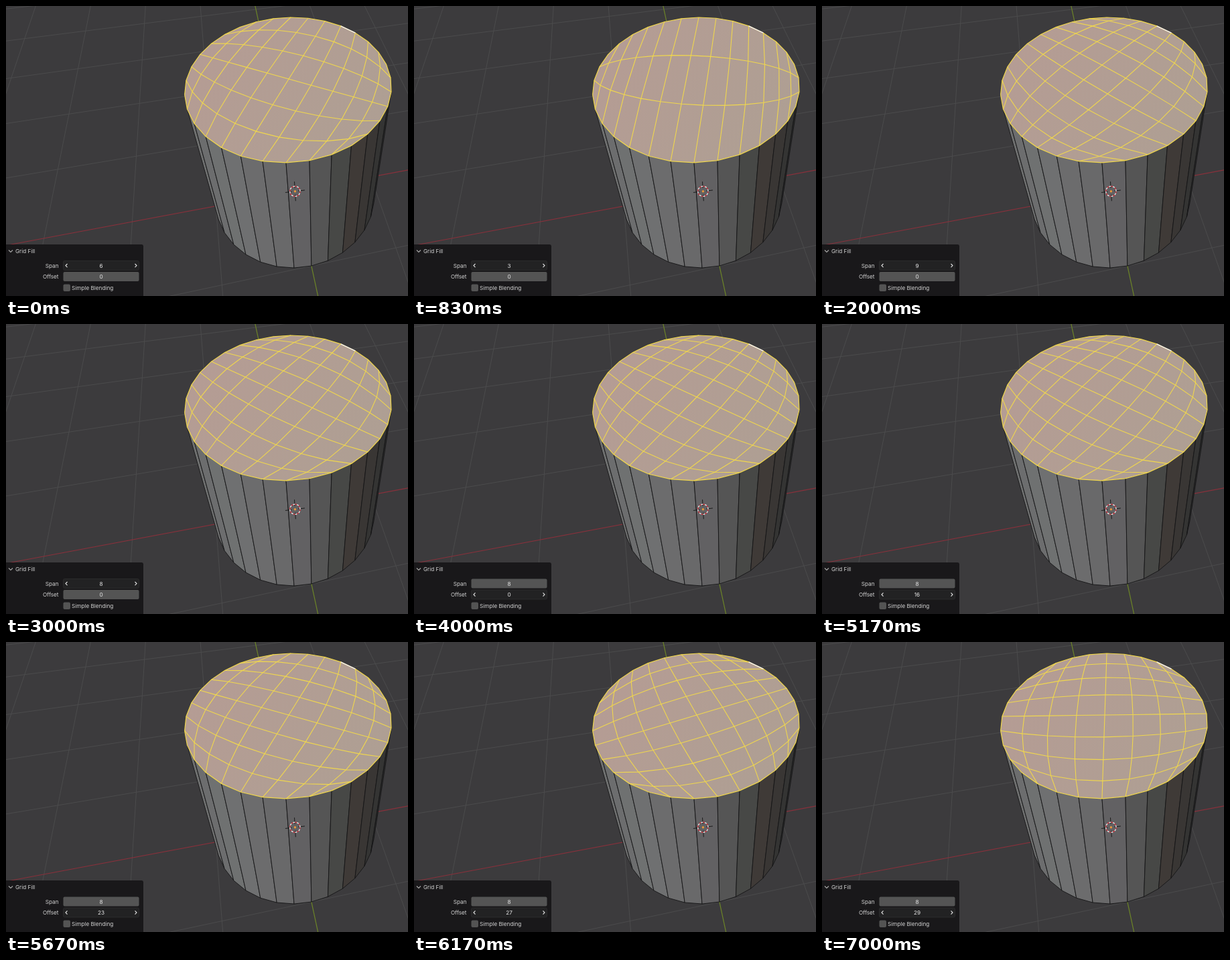
These frames come from a looping animation (600 by 433 pixels, 7.25 s). An HTML page with a canvas:

```html
<!DOCTYPE html>
<html lang="en">
<head>
<meta charset="utf-8">
<title>Grid Fill</title>
<style>
  html, body { margin: 0; width: 100%; height: 100%; overflow: hidden; background: #3c3b3d; }
  #stage { position: relative; width: 600px; height: 433px; overflow: hidden; }
  canvas, svg { position: absolute; left: 0; top: 0; }
  text { font: 8.2px Inter, "Open Sans", sans-serif; fill: #d2d2d2; }
  .label { text-anchor: end; }
  .value { text-anchor: middle; fill: #e8e8e8; }
  .box { fill: #545454; }
  .arrows { display: none; }
  .icon { fill: none; stroke: #e4e4e4; stroke-width: 1.1; }
  .active .box { fill: #222223; stroke: #353535; stroke-width: .6; }
  .active .arrows { display: inline; }
</style>
</head>
<body>
<div id="stage">
  <canvas id="view" width="600" height="433"></canvas>
  <svg width="600" height="433">
    <path d="M0 356H202Q205 356 205 359V433H0Z" fill="#19181a"/>
    <path class="icon" d="M4 364.5L7 367.5L10 364.5" style="stroke:#aaa"/>
    <text x="14" y="369">Grid Fill</text>
    <text class="label" x="78.5" y="390.7">Span</text>
    <g id="span">
      <rect class="box" x="85.5" y="380.5" width="113" height="14" rx="2"/>
      <path class="icon arrows" d="M91.5 385L89 387.6L91.5 390.2M192.5 385L195 387.6L192.5 390.2"/>
      <text class="value" x="142" y="390.7"></text>
    </g>
    <text class="label" x="78.5" y="407">Offset</text>
    <g id="offset">
      <rect class="box" x="85.5" y="397" width="113" height="14" rx="2"/>
      <path class="icon arrows" d="M91.5 401.4L89 404L91.5 406.6M192.5 401.4L195 404L192.5 406.6"/>
      <text class="value" x="142" y="407"></text>
    </g>
    <rect x="85.5" y="415.5" width="10.5" height="10.5" rx="2" fill="#545454"/>
    <text x="98" y="423.6">Simple Blending</text>
  </svg>
</div>
<script>
const LOOP = 7250, FRAME = 1000 / 12, COUNT = 32, STEP = Math.PI / 16;
const ctx = document.getElementById('view').getContext('2d');

// Perspective of a horizontal plane; each plane differs only in its centre.
const plane = (x0, y0, w0) => ([u, v]) => {
  const w = w0 + .0035 * u - .152 * v;
  return [(x0 + 154 * u - 67.6 * v) / w, (y0 - 1.63 * u + 89.4 * v) / w];
};
const top3d = plane(422.03, 109, 1);
const floor3d = plane(560.8, 359.1, 1.299);

const rim = k => [Math.sin((k - 7) * STEP), Math.cos((k - 7) * STEP)];
const world = (x, y) => floor3d([.981 * x - .195 * y, -.195 * x - .981 * y]);

function trace(points, close) {
  ctx.beginPath();
  points.forEach(p => ctx.lineTo(p[0], p[1]));
  if (close) ctx.closePath();
}
function line(points, color, width = 1) {
  trace(points);
  ctx.strokeStyle = color;
  ctx.lineWidth = width;
  ctx.stroke();
}
function fill(points, color) {
  trace(points, true);
  ctx.fillStyle = color;
  ctx.fill();
}

function drawFloor() {
  ctx.fillStyle = '#3c3b3d';
  ctx.fillRect(0, 0, 600, 433);
  for (let n = -8; n <= 12; n++) {
    if (!n) continue;
    if (n <= 8) line([world(n, -4), world(n, 16)], '#4b4b4c');
    if (n >= -4) line([world(-8, n), world(8, n)], '#4b4b4c');
  }
  line([world(-8, 0), world(8, 0)], '#8a303b', 1.1);
  line([world(0, -4), world(0, 16)], '#6c8428', 1.2);
}

const shades = ['#6c6d6d', '#6e6f6f', '#6c6d6e', '#6f7171', '#6f7071', '#6c6c6d', '#69696a',
  '#626163', '#555555', '#474846', '#3f3a37', '#393634', '#343433', '#2e2e2e', '#2b2b2b'];

function drawSides() {
  for (let k = -1; k < 17; k++) {
    const a = top3d(rim(k)), b = top3d(rim(k + 1));
    const c = floor3d(rim(k + 1)), d = floor3d(rim(k));
    const facing = (b[0] - a[0]) * (d[1] - a[1]) - (b[1] - a[1]) * (d[0] - a[0]);
    if (facing <= 0) continue;
    fill([a, b, c, d], shades[Math.min(14, Math.max(0, k))]);
    line([a, d, c, b], '#161617', .9);
  }
}

function drawCursor() {
  const [x, y] = [431.4, 276.7];
  for (const [dx, dy] of [[1, -.12], [.06, 1]])
    for (const s of [-1, 1])
      line([[x + 5 * s * dx, y + 5 * s * dy], [x + 14.5 * s * dx, y + 14.5 * s * dy]], '#1a1a1a');
  for (let i = 0; i < 16; i++) {
    ctx.beginPath();
    ctx.arc(x, y, 7.6, i * Math.PI / 8, (i + 1) * Math.PI / 8);
    ctx.strokeStyle = i % 2 ? '#f2eeee' : '#d8303c';
    ctx.lineWidth = 1.3;
    ctx.stroke();
  }
  ctx.beginPath();
  ctx.arc(x, y, 1.7, 0, 7);
  ctx.fillStyle = '#e8953a';
  ctx.fill();
}

// Moves p by the turn and scale that carry segment a-b onto l-r.
function carry(p, a, b, l, r) {
  const bx = b[0] - a[0], by = b[1] - a[1], rx = r[0] - l[0], ry = r[1] - l[1];
  const px = p[0] - a[0], py = p[1] - a[1], q = bx * bx + by * by;
  const c = (rx * bx + ry * by) / q, s = (ry * bx - rx * by) / q;
  return [l[0] + px * c - py * s, l[1] + px * s + py * c];
}

// Both long sides are carried to each row between the rails, then blended.
function gridPoints(span, offset) {
  const cols = COUNT / 2 - span, start = -offset;
  const far = x => rim(start - span - x), near = x => rim(start + x);
  const rows = [];
  for (let y = 0; y <= span; y++) {
    const l = rim(start - span + y), r = rim(start + 16 - y), t = y / span, row = [];
    for (let x = 0; x <= cols; x++) {
      const a = carry(far(x), far(0), far(cols), l, r);
      const b = carry(near(x), near(0), near(cols), l, r);
      const edge = y === 0 ? far(x) : y === span ? near(x) : null;
      row.push(top3d(edge || [a[0] + (b[0] - a[0]) * t, a[1] + (b[1] - a[1]) * t]));
    }
    rows.push(row);
  }
  return rows;
}

const skin = ctx.createLinearGradient(290, 40, 560, 190);
skin.addColorStop(0, '#b59c94');
skin.addColorStop(1, '#ae9f93');

function drawTop(span, offset) {
  const yellow = '#efd64e';
  const edge = Array.from({ length: COUNT + 1 }, (_, k) => top3d(rim(k)));
  const rows = gridPoints(span, offset);
  fill(edge, skin);
  rows.slice(1, -1).forEach(row => line(row, yellow, 1.1));
  for (let x = 1; x < rows[0].length - 1; x++) line(rows.map(row => row[x]), yellow, 1.1);
  line(edge, yellow, 1.2);
  line([edge[19], edge[20]], '#f6f2f4', 1.3);
}

// [frame, value] pairs
const spanKeys = [[0, 6], [3, 5], [6, 4], [9, 3], [13, 4], [15, 5], [17, 6], [19, 7], [22, 8], [24, 9], [28, 8]];
const offsetKeys = [[50, 0], [56, 8], [68, 23], [74, 27], [83, 29]];
const HOVER_OFFSET = 39;

const held = (keys, f) => keys.filter(k => k[0] <= f).pop()[1];
function ramp(keys, f) {
  if (f <= keys[0][0]) return keys[0][1];
  for (let i = 1; i < keys.length; i++) {
    const [f0, v0] = keys[i - 1], [f1, v1] = keys[i];
    if (f <= f1) return Math.round(v0 + (v1 - v0) * (f - f0) / (f1 - f0));
  }
  return keys[keys.length - 1][1];
}

function setField(id, value, active) {
  const field = document.getElementById(id);
  field.setAttribute('class', active ? 'active' : '');
  field.querySelector('text').textContent = value;
}

let shown = -1;
function draw(time) {
  const frame = Math.floor((time % LOOP + 7) / FRAME) % 87;
  if (frame !== shown) {
    shown = frame;
    const span = held(spanKeys, frame), offset = ramp(offsetKeys, frame);
    drawFloor();
    drawSides();
    drawTop(span, offset);
    drawCursor();
    setField('span', span, frame < HOVER_OFFSET);
    setField('offset', offset, frame >= HOVER_OFFSET);
  }
}

const begin = performance.now();
function tick() {
  draw(performance.now() - begin);
  requestAnimationFrame(tick);
}
tick();
</script>
</body>
</html>
```
